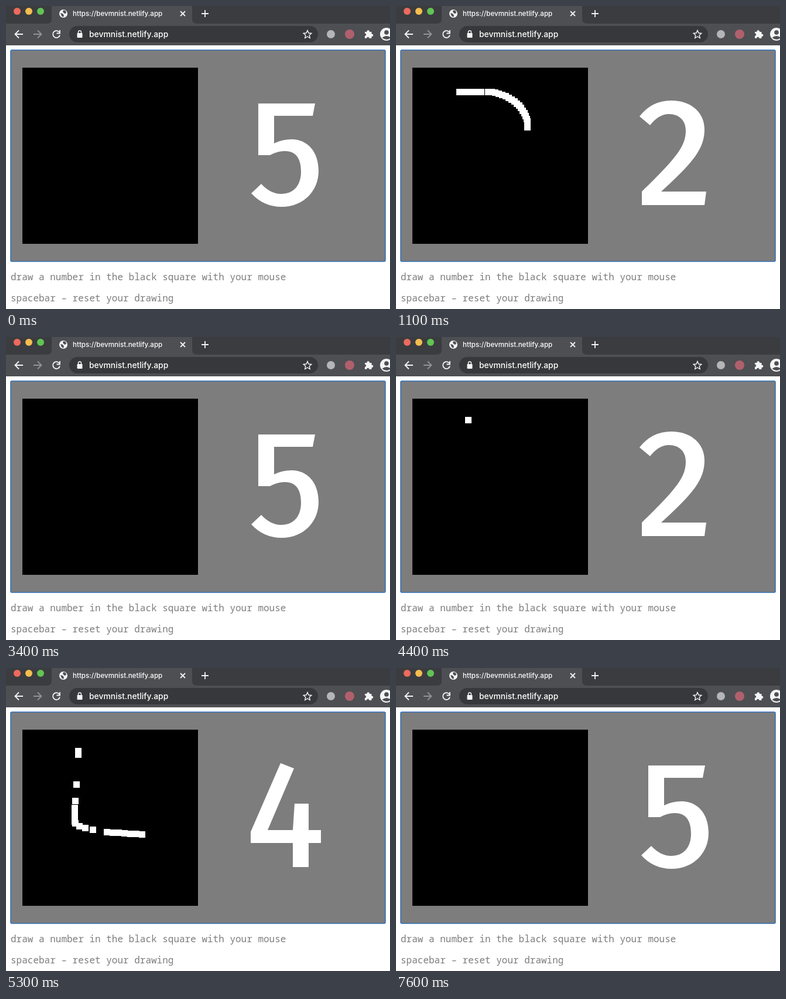
Recreate the animation shown at these times as an HTML page with a canvas. Size 656 px wide and 516 px high, loop 8 s.

```html
<!DOCTYPE html>
<html lang="en">
<head>
<meta charset="utf-8">
<title>Digit recognizer</title>
<style>
  html, body { margin: 0; width: 100%; height: 100%; overflow: hidden; background: #fff; }
  svg, canvas { position: absolute; left: 0; top: 0; display: block; }
  .ui { font-family: Inter, Roboto, sans-serif; font-weight: 500; fill: #fff; }
  .hint { font: 500 16px "Noto Sans Mono", "DejaVu Sans Mono", monospace; fill: #7d7d7d; }
  .line { fill: none; stroke: #f4f4f5; stroke-width: 1.8; }
  .thin { stroke-width: 1.4; }
  .dim { stroke: #929397; }
  .light { fill: #f4f4f5; }
  .bar { fill: #4e4f53; }
</style>
</head>
<body>
<svg width="656" height="516" viewBox="0 0 656 516">
  <!-- tab strip -->
  <rect width="656" height="31" fill="#3b3c3f"/>
  <path class="bar" d="M0 30H70Q78 30 78 22V0H318V22Q318 30 326 30H656V67H0Z"/>
  <circle cx="19" cy="9" r="6" fill="#ed6a5e"/>
  <circle cx="39" cy="9" r="6" fill="#f4bd4f"/>
  <circle cx="59" cy="9" r="6" fill="#61c454"/>
  <circle class="light" cx="98" cy="13" r="7"/>
  <path class="bar" d="M93 12l4 1 2 3-1 3-3-2ZM98 7l4 1 1 4-3 1-3-3Z"/>
  <text class="ui" x="114" y="17" font-size="11.6">https://bevmnist.netlify.app</text>
  <path class="line" d="M298 9l8 8M306 9l-8 8M334 13h12M340 7v12"/>
  <!-- toolbar -->
  <path class="line" d="M29 48H16M22 41.500l-6.500 6.500 6.500 6.500"/>
  <path class="line dim" d="M47 48h13M54 41.500l6.500 6.500-6.500 6.500"/>
  <path class="line" d="M91 44.500A6 6 0 1 0 92 49.500M92 41v5.500h-5.500"/>
  <rect x="108" y="34" width="425" height="28" rx="14" fill="#37383b"/>
  <rect class="light" x="121.500" y="46" width="9" height="8" rx="1"/>
  <path class="line thin" d="M123.500 47v-2.500a2.500 2.500 0 0 1 5 0V47"/>
  <text class="ui" x="142" y="53" font-size="13.9">bevmnist.netlify.app</text>
  <path class="line thin" d="M515 41.500l2 4.500 4.800.5-3.600 3.300 1 4.700-4.200-2.500-4.200 2.500 1-4.700-3.600-3.300 4.800-.5Z"/>
  <circle cx="555" cy="48" r="7" fill="#b4b5b6"/>
  <circle cx="587" cy="48" r="8" fill="#b0606d"/>
  <path class="light" d="M613 44h3.500a2.300 2.300 0 1 1 4.500 0h3.500v3.500a2.300 2.300 0 1 1 0 4.500v3h-4a2.200 2.200 0 0 0-4.400 0H613v-4a2.200 2.200 0 0 0 0-4.400Z"/>
  <circle class="light" cx="650" cy="48" r="11"/>
  <circle class="bar" cx="650" cy="45" r="3.800"/>
  <path class="bar" d="M642.500 54q7.500-6 15 0-7.500 6-15 0Z"/>
  <!-- app -->
  <rect x="8" y="75" width="640" height="360" rx="2" fill="#7d7d7d" stroke="#326fb4" stroke-width="1.600"/>
  <text class="hint" x="8" y="467">draw a number in the black square with your mouse</text>
  <text class="hint" x="8" y="503">spacebar – reset your drawing</text>
</svg>
<canvas id="stage" width="656" height="516"></canvas>
<script>
const ctx = document.getElementById('stage').getContext('2d');
const LOOP = 8000, STEP = 100, PEN = 11;

// Outlines of the large digits
const glyphs = {
  2: new Path2D('M416 188Q437 161 470 161C505 161 527 182 527 210C527 243 508 266 453 316H530L527 339H420V316C481 257 495 238 495 212C495 195 484 184 466 184Q449 184 434 203Z'),
  3: new Path2D('M417 183Q440 161 468 161C504 161 526 181 526 206S512 243 490 247C514 250 532 265 532 290S508 342 470 342Q436 342 413 317L431 302Q448 319 469 319C489 319 501 307 501 289S489 258 470 258H454L458 236H469C486 236 497 226 497 209S486 184 468 184Q449 184 433 199Z'),
  4: new Path2D('M469 162L492 171L447 276H490L493 231H517V276H538V298H517V339H490V298H418V279Z'),
  5: new Path2D('M431 166H528L524 187H458V234Q472 227 488 227C515 227 534 248 534 281S509 342 471 342Q440 342 419 319L436 303Q452 320 470 320C491 320 504 306 504 282S494 247 476 247Q464 247 451 254H431Z'),
  7: new Path2D('M424 166H532V186L464 342L437 333L502 189H424Z')
};

const mix = (a, b, f) => a.map((v, i) => v + (b[i] - v) * f);

// Point on a Bezier curve with any number of control points
function bezier(pts, f) {
  while (pts.length > 1) pts = pts.slice(1).map((p, i) => mix(pts[i], p, f));
  return pts[0];
}

// Stamps the square pen every `gap` pixels, from time `start` to `end`
function stroke(t, start, end, gap, ...pts) {
  if (t < start) return;
  const done = t >= end ? 1 : (t - start) / (end - start);
  const [a, b] = [pts[0], pts[pts.length - 1]];
  const n = Math.max(1, Math.round(Math.hypot(b[0] - a[0], b[1] - a[1]) / gap));
  for (let k = 0; k <= n * done; k++) {
    const [x, y] = bezier(pts, k / n);
    ctx.fillRect(Math.round(x), Math.round(y), PEN, PEN);
  }
}

function drawThree(t) {
  stroke(t, 400, 400, 1, [103, 141]);
  stroke(t, 500, 700, 5, [103, 141], [140, 141]);
  stroke(t, 700, 1100, 5, [152, 141], [190, 142], [222, 172], [219, 201]);
  stroke(t, 1100, 1500, 5, [219, 199], [200, 210], [175, 217], [147, 219]);
  stroke(t, 1600, 2100, 5, [147, 219], [185, 225], [212, 255], [212, 280]);
  stroke(t, 2100, 2100, 1, [212, 292]);
  stroke(t, 2100, 2200, 5, [209, 304], [204, 310], [180, 311]);
  stroke(t, 2200, 2300, 10, [168, 311], [137, 314]);
}

function drawFour(t) {
  stroke(t, 4400, 4400, 1, [118, 136]);
  stroke(t, 4500, 4600, 6, [118, 136], [118, 142]);
  stroke(t, 4700, 4800, 28, [115, 193], [113, 221]);
  stroke(t, 4800, 4800, 8, [112, 233], [112, 256]);
  stroke(t, 4900, 5000, 11, [113, 259], [121, 267], [143, 270]);
  stroke(t, 5000, 5300, 10, [167, 274], [227, 278]);
  stroke(t, 5600, 5700, 9, [185, 244], [185, 253]);
  stroke(t, 5900, 6000, 11, [182, 264], [178, 296]);
  stroke(t, 6100, 6100, 7, [174, 311], [174, 318]);
  stroke(t, 6200, 6300, 9, [174, 332], [173, 360]);
}

function guess(t) {
  if (t < 400) return 5;
  if (t < 3300) return t < 1300 ? 2 : 3;
  if (t < 4400 || t >= 6600) return 5;
  if (t < 4700) return 2;
  return t < 5100 ? 7 : 4;
}

function render(now) {
  const t = Math.floor(now % LOOP / STEP) * STEP;
  ctx.clearRect(0, 0, 656, 516);
  ctx.fillStyle = '#000';
  ctx.fillRect(28, 105, 300, 300);
  ctx.fillStyle = '#fff';
  if (t < 3300) drawThree(t);
  else if (t < 6600) drawFour(t);
  ctx.fill(glyphs[guess(t)]);
}

const began = performance.now();
function tick() {
  render(performance.now() - began);
  requestAnimationFrame(tick);
}
tick();
</script>
</body>
</html>
```
